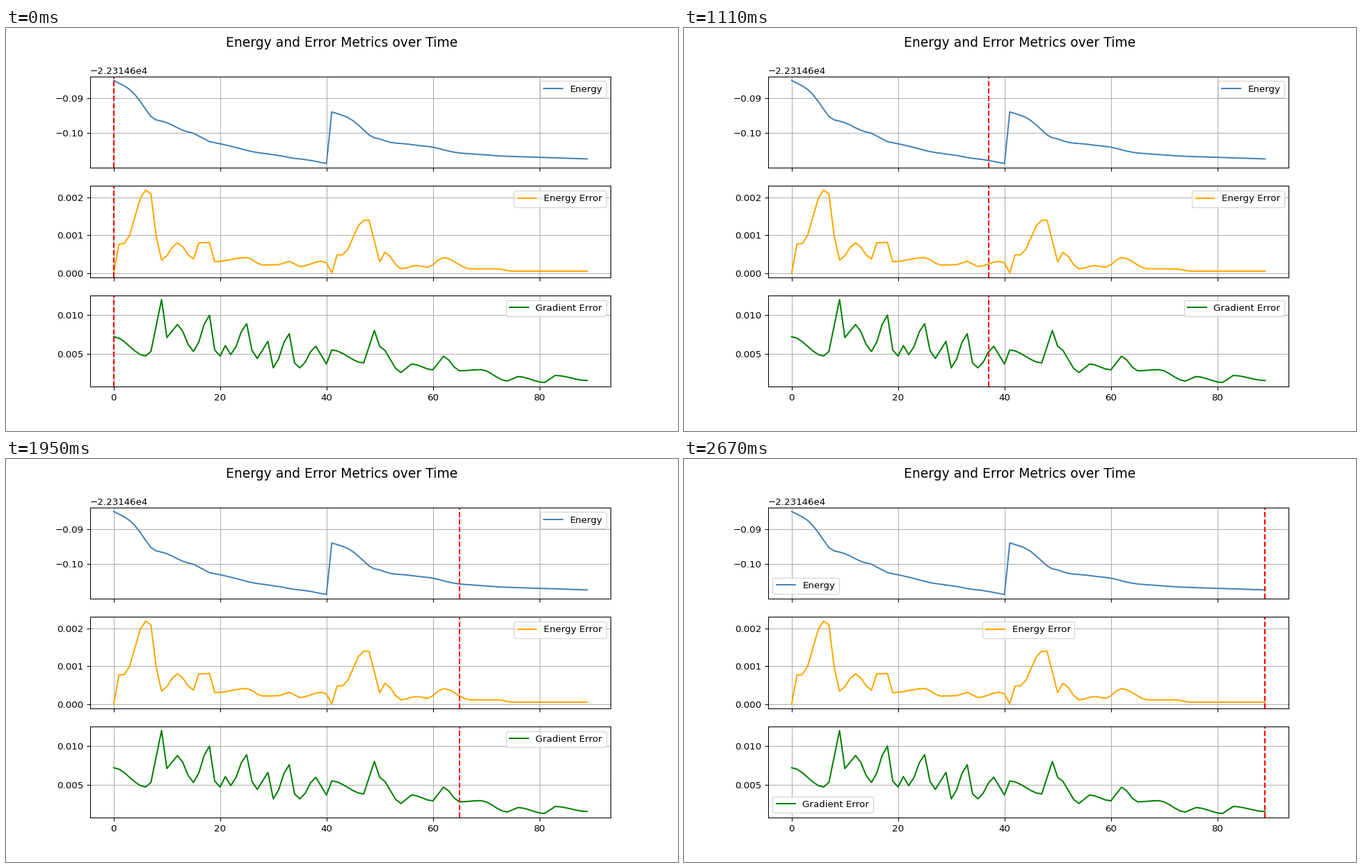
A matplotlib script for the animation above (2700 ms loop, 966x580 px).

```python
import numpy as np
import matplotlib.pyplot as plt
from matplotlib.animation import FuncAnimation

STEPS = 90
INTERVAL = 30  # ms
RESTART = 41  # step at which the second run begins

plt.rcParams["font.family"] = "DejaVu Sans"
steps = np.arange(STEPS)


def eased(knots):
    """Smoothstep from one turning point (step, height) to the next."""
    x, y = np.array(knots).T
    i = np.clip(np.searchsorted(x, steps, side="right") - 1, 0, len(x) - 2)
    u = (steps - x[i]) / (x[i + 1] - x[i])
    return y[i] + (y[i + 1] - y[i]) * u * u * (3 - 2 * u)


# Turning points of both error curves, heights in 1e-5
energy_error = 1e-5 * eased([
    (0, 0), (1, 77), (2, 78), (6, 220), (7, 210), (8, 97), (9, 34),
    (12, 80), (15, 37), (16, 80), (18, 81), (19, 30), (25, 41), (28, 21),
    (31, 22), (33, 31), (35, 17), (39, 31), (40, 27),
    (41, 0), (42, 48), (43, 48), (47, 140), (48, 140), (50, 30), (51, 55),
    (54, 11), (57, 20), (59, 15), (62, 41), (67, 11), (72, 11), (75, 5),
    (89, 5)])

gradient_error = 1e-5 * eased([
    (0, 724), (6, 476), (7, 534), (9, 1203), (10, 713), (12, 882),
    (15, 534), (18, 1002), (19, 552), (20, 476), (21, 610), (22, 494),
    (25, 892), (26, 547), (27, 444), (29, 664), (30, 323), (33, 763),
    (34, 386), (35, 323), (38, 601), (40, 373), (41, 554), (47, 386),
    (49, 805), (50, 601), (54, 263), (56, 373), (60, 297), (62, 473),
    (65, 285), (69, 300), (74, 153), (76, 211), (81, 134), (83, 225),
    (89, 160)])

# Each step lowers the energy by its error; the second run starts afresh
energy = -22314.6 - np.concatenate([
    0.0850 + np.cumsum(energy_error[:RESTART]),
    0.0940 + np.cumsum(energy_error[RESTART:])])

fig, axes = plt.subplots(3, 1, sharex=True, figsize=(10, 6.0042), dpi=96.6)
fig.suptitle("Energy and Error Metrics over Time", fontsize=14)

series = [
    (energy, "Energy", "steelblue"),
    (energy_error, "Energy Error", "orange"),
    (gradient_error, "Gradient Error", "green"),
]
cursors = []
for ax, (values, label, color) in zip(axes, series):
    ax.plot(steps, values, color=color, label=label)
    ax.grid(True)
    # "best" moves the legend away once the cursor reaches it
    ax.legend(loc="best")
    cursors.append(ax.axvline(0, color="red", linestyle="--"))


def update(step):
    for cursor in cursors:
        cursor.set_xdata([step, step])
    return cursors


anim = FuncAnimation(fig, update, frames=STEPS, interval=INTERVAL,
                     repeat=True, repeat_delay=0, blit=False)
plt.show()
```
